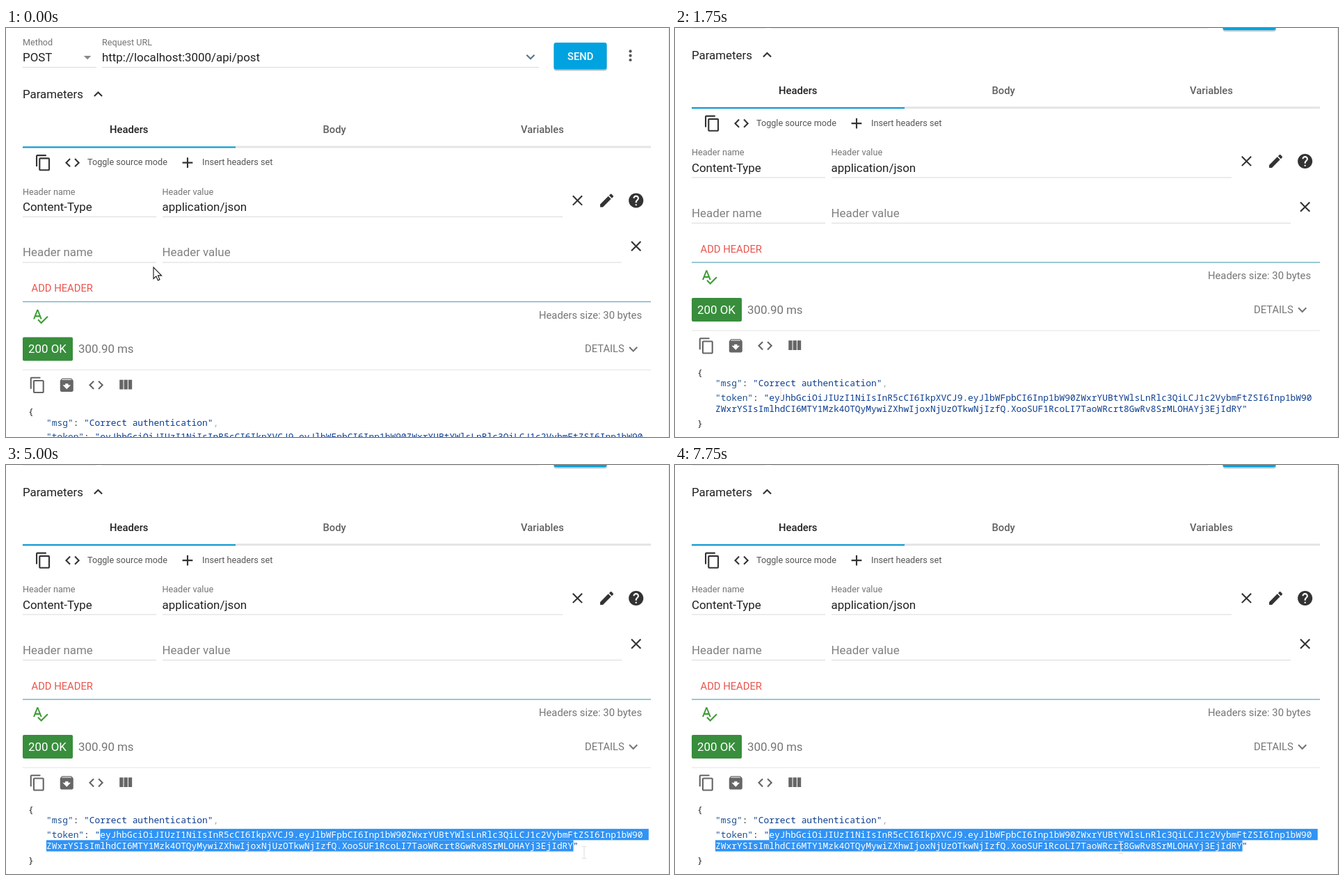
Recreate the animation shown at these times as an HTML page. Size 953 by 588 pixels, loop 8000 ms.

```html
<!DOCTYPE html>
<html lang="en">
<head>
<meta charset="utf-8">
<title>REST request</title>
<style>
  html, body { margin: 0; width: 100%; height: 100%; overflow: hidden; background: #fff; }
  svg { display: block; width: 953px; height: 588px; }
  text { font-family: Roboto, sans-serif; white-space: pre; }
  .mono text { font-family: "Noto Sans Mono", monospace; }
  .inverted text { fill: #fff; }
</style>
</head>
<body>
<svg id="stage" viewBox="0 0 953 588" xmlns="http://www.w3.org/2000/svg">
  <defs><clipPath id="selected"></clipPath></defs>
  <g id="page"></g>
  <path d="M952.5 0V588" stroke="#e8e8e8"/>
  <g id="menu" fill="none" stroke-linecap="round">
    <path d="M692 578H844V547" stroke="#ddd" stroke-width="3"/>
    <path d="M691 577H843V546" stroke="#979797" stroke-width="1.2"/>
  </g>
  <path id="arrow" d="M0 0V16.4L3.8 12.9L6.4 18.8L9 17.7L6.5 11.9H11.6Z" fill="#fff" stroke="#111" stroke-width="1.1"/>
  <path id="beam" d="M-3.5 -8.5H3.5M0 -8.5V8.5M-3.5 8.5H3.5" fill="none" stroke="#e2e2e2" stroke-width="1.2"/>
</svg>
<script>
const LOOP = 8000, STEP = 250;
const ZOOM = 1.056, COL = 7.73, CODE_X = 58;
const INK = '#212121', DARK = '#333', GREY = '#757575', BLUE = '#00a2df';
const KEY = '#1c4f8f', STRING = '#0b3d91';
const $ = id => document.getElementById(id);
const page = $('page');

function add(parent, tag, attrs, content = '') {
  const node = document.createElementNS('http://www.w3.org/2000/svg', tag);
  for (const name in attrs) node.setAttribute(name, attrs[name]);
  node.textContent = content;
  parent.append(node);
  return node;
}

const label = (x, y, content, size = 16, fill = INK, weight = 400) =>
  add(page, 'text', { x, y, fill, 'font-size': size * ZOOM, 'font-weight': weight }, content);
const box = (x, y, width, height, fill, rx = 0) =>
  add(page, 'rect', { x, y, width, height, fill, rx });
const rule = (x1, x2, y, fill = '#dadada', height = 1) => box(x1, y, x2 - x1, height, fill);

const ICONS = {
  copy: 'M16 1H4c-1.1 0-2 .9-2 2v14h2V3h12V1zm3 4H8c-1.1 0-2 .9-2 2v14c0 1.1.9 2 2 2h11c1.1 0 2-.9 2-2V7c0-1.1-.9-2-2-2zm0 16H8V7h11v14z',
  code: 'M9.4 16.6L4.8 12l4.6-4.6L8 6l-6 6 6 6zM14.6 16.6l4.6-4.6-4.6-4.6L16 6l6 6-6 6z',
  plus: 'M19 13h-6v6h-2v-6H5v-2h6V5h2v6h6z',
  close: 'M19 6.4L17.6 5 12 10.6 6.4 5 5 6.4 10.6 12 5 17.6 6.4 19 12 13.4 17.6 19 19 17.6 13.4 12z',
  edit: 'M3 17.25V21h3.75L17.8 9.95l-3.75-3.75zM20.7 7c.4-.4.4-1 0-1.4l-2.3-2.3c-.4-.4-1-.4-1.4 0l-1.85 1.85 3.75 3.75z',
  help: 'M12 2C6.48 2 2 6.48 2 12s4.48 10 10 10 10-4.48 10-10S17.52 2 12 2zm1 17h-2v-2h2v2zm2.07-7.75l-.9.92C13.45 12.9 13 13.5 13 15h-2v-.5c0-1.1.45-2.1 1.17-2.83l1.24-1.26c.37-.36.59-.86.59-1.41 0-1.1-.9-2-2-2s-2 .9-2 2H8c0-2.21 1.79-4 4-4s4 1.79 4 4c0 .88-.36 1.68-.93 2.25z',
  down: 'M16.6 8.6L12 13.2 7.4 8.6 6 10l6 6 6-6z',
  up: 'M12 8l-6 6 1.4 1.4L12 10.8l4.6 4.6L18 14z',
  caret: 'M7 10l5 5 5-5z',
  archive: 'M20.5 5.2l-1.4-1.65C18.9 3.2 18.5 3 18 3H6c-.5 0-.9.2-1.2.55L3.5 5.2C3.2 5.6 3 6 3 6.5V19c0 1.1.9 2 2 2h14c1.1 0 2-.9 2-2V6.5c0-.5-.2-.9-.5-1.3zM12 17.5L6.5 12H10v-2h4v2h3.5zM5.1 5l.8-1h12l.95 1z',
  columns: 'M4 5h5v13H4zM10 5h5v13h-5zM16 5h5v13h-5z',
  spell: 'M12.45 16h2.1L9.4 3H7.6L2.45 16h2.1l1.1-3h5.65zm-6-5L8.5 5.5l2.1 5.5zM21.6 11.6l-8.1 8.1L9.8 16l-1.4 1.4 5.1 5.1L23 13z'
};
const icon = (name, x, y, fill = DARK) => add(page, 'path', {
  d: ICONS[name], fill, 'fill-rule': 'evenodd', transform: `translate(${x} ${y}) scale(${ZOOM})`
});

function buildRequest() {
  label(24, 24.5, 'Method', 12, GREY);
  label(24, 48, 'POST');
  icon('caret', 104.4, 29.4, '#888');
  label(138, 24.5, 'Request URL', 12, GREY);
  label(138, 48, 'http://localhost:3000/api/post');
  icon('down', 741.3, 28.9, '#5b7384');
  rule(24, 130, 56);
  rule(138, 766, 56);
  box(787.5, 23, 76.5, 39, '#dedede', 4);
  box(787.5, 22, 76, 39, '#b5c6cd', 3);
  box(787.5, 21, 76, 38.5, BLUE, 3);
  label(807, 46, 'SEND', 14, '#fff', 500);
  for (const y of [33.4, 39.7, 46]) add(page, 'circle', { cx: 897.5, cy: y, r: 2.1, fill: '#555' });

  label(24, 101, 'Parameters');
  icon('up', 119.8, 82.5);
  label(149, 151, 'Headers', 14, INK, 500);
  label(455.5, 151, 'Body', 14, '#606060', 500);
  label(740, 151, 'Variables', 14, '#606060', 500);
  rule(330, 927, 169.5, '#e5e5e5', 3);
  rule(24, 330, 170.3, '#0f9ad0', 2.2);
}

function buildHeaders() {
  icon('copy', 40.9, 181);
  icon('code', 82.9, 181);
  label(117, 197.3, 'Toggle source mode', 12, '#555');
  icon('plus', 248.3, 181);
  label(282, 197.3, 'Insert headers set', 12, '#555');

  label(24, 239.5, 'Header name', 12, GREY);
  label(224.5, 239.5, 'Header value', 12, GREY);
  label(24, 263, 'Content-Type');
  label(224.5, 263, 'application/json');
  label(24, 328, 'Header name', 16, '#808080');
  label(224.5, 328, 'Header value', 16, '#808080');
  rule(24, 216, 271);
  rule(225, 800, 271);
  rule(24, 216, 336.5);
  rule(225, 885, 336.5);
  icon('close', 808.8, 235.3);
  icon('edit', 850.9, 235.3);
  icon('help', 893, 235.3);
  icon('close', 893, 301);

  label(36.5, 379, 'ADD HEADER', 14, '#e8554e');
  rule(24, 927, 392.8, '#6fb0c2', 1.4);
  icon('spell', 36.4, 401.7, '#3f9c35');
  label(766, 417.8, 'Headers size: 30 bytes', 14, GREY);
}

function buildResponse() {
  box(24, 444.5, 72, 34, '#388e3c', 2);
  label(32, 467, '200 OK', 16, '#fff');
  label(104, 467, '300.90 ms', 16, GREY);
  label(832, 466.4, 'DETAILS', 14, GREY);
  icon('down', 889, 449, GREY);
  rule(24, 927, 491, '#e4e4e4');
  icon('copy', 32.6, 500.7, '#666');
  icon('archive', 74.6, 500.7, '#666');
  icon('code', 116.9, 500.7, '#666');
  icon('columns', 159, 500.4, '#666');
}

const TOKEN = [
  'eyJhbGciOiJIUzI1NiIsInR5cCI6IkpXVCJ9.eyJlbWFpbCI6Inp1bW90ZWxrYUBtYWlsLnRlc3QiLCJ1c2VybmFtZSI6Inp1bW90',
  'ZWxrYSIsImlhdCI6MTY1Mzk4OTQyMywiZXhwIjoxNjUzOTkwNjIzfQ.XooSUF1RcoLI7TaoWRcrt8GwRv8SrMLOHAYj3EjIdRY'
];

function buildCode(className) {
  const group = add(page, 'g', { class: className, 'font-size': COL / 0.6 });
  const put = (x, y, content, fill) => add(group, 'text', { x, y, fill }, content);
  const pair = (y, key, value) => {
    put(CODE_X, y, `"${key}"`, KEY);
    put(CODE_X + (key.length + 2) * COL, y, ':', INK);
    put(CODE_X + (key.length + 4) * COL, y, value, STRING);
  };
  put(32, 556, '{', INK);
  pair(571.5, 'msg', '"Correct authentication"');
  put(CODE_X + 31 * COL, 571.5, ',', '#aaa');
  pair(592, 'token', '"' + TOKEN[0]);
  put(CODE_X, 608, TOKEN[1] + '"', STRING);
  put(32, 629, '}', INK);
  return group;
}

buildRequest();
buildHeaders();
buildResponse();
buildCode('mono');
const highlight = add(page, 'g', { fill: '#3093f5' });
buildCode('mono inverted').setAttribute('clip-path', 'url(#selected)');

// Token line 1, token line 2, closing brace
const selectionBoxes = [
  { x: CODE_X + 10 * COL, y: 579.6, height: 16.2 },
  { x: CODE_X, y: 595.8, height: 16.2 },
  { x: 32, y: 616.5, height: 17 }
].map(attrs => [add(highlight, 'rect', attrs), add($('selected'), 'rect', attrs)]);

// Each track: [time, ...values], held until the next entry
const SCROLL = [[0, 0], [500, 28], [750, 56.5]];
const POINTER = [
  [0, 212, 344, 'arrow'],
  [1250, 203, 390, 'arrow'], [1500, 178, 465, 'arrow'], [1750, 152, 526, 'beam'],
  [2000, 142, 546, 'beam'], [2250, 138.5, 534, 'beam'],
  [2750, 252.5, 539, 'beam'], [3000, 430, 553, 'beam'], [3250, 635, 570, 'beam'],
  [3750, 700, 573, 'beam'], [4000, 780, 574, 'beam'], [4250, 842, 568, 'beam'],
  [4500, 834, 552, 'beam'], [4750, 816, 540, 'beam'], [5000, 831, 557, 'beam'],
  [5500, 780, 556, 'beam'], [5750, 722, 551, 'beam'], [6000, 691, 549, 'beam'],
  [6500, 687, 543, 'arrow'], [6750, 695, 549, 'arrow'], [7000, 720, 560, 'arrow'],
  [7500, 690, 558, 'arrow'], [7750, 641, 550, 'beam']
];
// Selected columns per box
const SELECTION = [
  [0, 0, 0, 0], [2750, 9, 0, 0], [3000, 102, 48, 0], [3250, 102, 100, 1],
  [4500, 102, 99, 0], [4750, 102, 98, 0]
];
const MENU = [[0, false], [6500, true], [7750, false]];

const at = (track, time) => track.findLast(entry => entry[0] <= time).slice(1);

function draw(now) {
  const time = Math.floor(now % LOOP / STEP) * STEP;
  page.setAttribute('transform', `translate(0 ${-at(SCROLL, time)[0]})`);

  const columns = at(SELECTION, time);
  selectionBoxes.forEach((rects, i) =>
    rects.forEach(rect => rect.setAttribute('width', columns[i] * COL)));

  const [x, y, kind] = at(POINTER, time);
  for (const name of ['arrow', 'beam']) {
    $(name).setAttribute('transform', `translate(${x} ${y})`);
    $(name).setAttribute('visibility', name === kind ? 'visible' : 'hidden');
  }
  $('menu').setAttribute('visibility', at(MENU, time)[0] ? 'visible' : 'hidden');
}

const start = performance.now();
function tick() {
  draw(performance.now() - start);
  requestAnimationFrame(tick);
}
tick();
</script>
</body>
</html>
```
